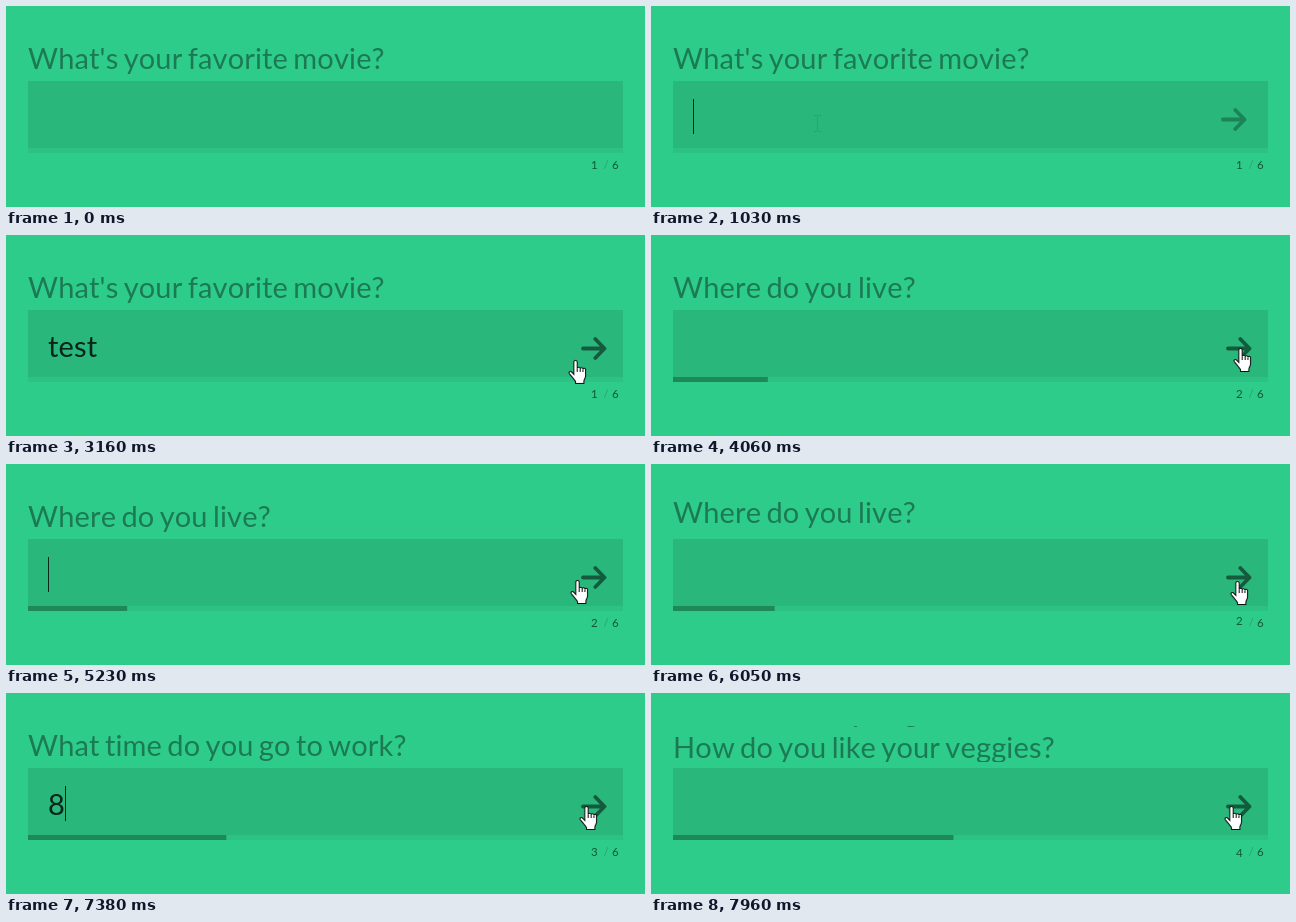
Animation, 639 px wide and 201 px high, one loop 8 s. Source, as an HTML page:

```html
<!DOCTYPE html>
<html lang="en">
<head>
<meta charset="utf-8">
<title>Minimal form</title>
<style>
html, body { margin: 0; width: 100%; height: 100%; overflow: hidden; background: #2ecc8a; }
body { position: relative; font: 29px Lato, sans-serif; font-kerning: none; }
svg { position: absolute; left: 0; top: 0; }

.rows, .bar, .next, .typed, .words, .mouse, .mouse > g { animation: 8s linear infinite; }

.questions { letter-spacing: .15px; word-spacing: -2.3px; fill: rgba(0, 0, 0, .4); }
.count { font-size: 11.5px; fill: rgba(0, 0, 0, .58); }
.slash { fill: rgba(0, 0, 0, .2); }

/* one row per step, shared by questions and counter */
.rows { animation-name: rows; animation-timing-function: ease; }
.questions .rows { --row: -36px; }
.count .rows { --row: -18px; }
@keyframes rows {
  0%, 46.5% { transform: translateY(0); }
  51.5%, 75.075% { transform: translateY(var(--row)); }
  /* the last slide is cut short by the loop */
  80.075%, 95.95% {
    transform: translateY(calc(var(--row) * 2));
    animation-timing-function: cubic-bezier(.28, .093, .306, .859);
  }
  100% { transform: translateY(calc(var(--row) * 2.978)); }
}

.bar { fill: rgba(0, 0, 0, .3); transform-origin: 22px 0; animation-name: bar; animation-timing-function: ease-in-out; }
@keyframes bar {
  0%, 46.5% { transform: scaleX(0); }
  51.5%, 75.075% { transform: scaleX(.16667); }
  80.075%, 95.95% {
    transform: scaleX(.33333);
    animation-timing-function: cubic-bezier(.4325, 0, .6416, .7508);
  }
  100% { transform: scaleX(.48775); }
}

.next {
  fill: none; stroke: #000; stroke-opacity: .5; stroke-width: 3.8; stroke-linecap: round; stroke-linejoin: round;
  animation-name: next; animation-timing-function: ease;
}
@keyframes next {
  0%, 11.625% { opacity: 0; transform: translateX(-12px); }
  15.375%, 100% { opacity: 1; transform: translateX(0); }
}

/* the right border is the caret */
.typed {
  position: absolute; left: 42px; top: 93px; height: 35px; box-sizing: border-box;
  overflow: hidden; white-space: nowrap; line-height: 35px; letter-spacing: .15px;
  color: rgba(0, 0, 0, .8); border-right: 1px solid transparent;
  animation-name: type; animation-timing-function: step-end;
}
@keyframes type {
  0% { width: 1px; border-color: transparent; }
  11.75% { width: 1px; border-color: #08251a; }
  17.875% { width: 1px; border-color: transparent; }
  21.375% { width: 12px; border-color: #08251a; }
  25.25% { width: 27px; border-color: #08251a; }
  28.25% { width: 40px; border-color: #08251a; }
  32.875% { width: 51px; border-color: #08251a; }
  39.125% { width: 51px; border-color: transparent; }
  46.5% { width: 1px; border-color: transparent; }
  52% { width: 1px; border-color: #08251a; }
  58.375% { width: 1px; border-color: transparent; }
  65.375% { width: 1px; border-color: #08251a; }
  68.5% { width: 16px; border-color: #08251a; }
  74.125% { width: 16px; border-color: transparent; }
  75.075% { width: 1px; border-color: transparent; }
  80% { width: 1px; border-color: #08251a; }
  86.25% { width: 1px; border-color: transparent; }
  87.75% { width: 18px; border-color: #08251a; }
  94% { width: 18px; border-color: transparent; }
  95.95%, 100% { width: 1px; border-color: transparent; }
}
.words { animation-name: words; animation-timing-function: step-end; }
@keyframes words {
  0% { transform: translateY(0); }
  46.5% { transform: translateY(-35px); }
  75.075%, 100% { transform: translateY(-70px); }
}

.mouse { animation-name: move; }
@keyframes move {
  0%, 5.75% { transform: translate(189px, 190px); }
  9.5%, 33.25% { transform: translate(166px, 117px); }
  35% { transform: translate(240px, 165px); }
  36.875% { transform: translate(400px, 184px); }
  38.5% { transform: translate(520px, 160px); }
  39.5% { transform: translate(570px, 125px); }
  41.625%, 43.25% { transform: translate(580px, 113px); }
  44%, 53.5% { transform: translate(590px, 113px); }
  54.875%, 68.25% { transform: translate(572px, 116px); }
  69.25%, 71.5% { transform: translate(588px, 123px); }
  72.25%, 84.75% { transform: translate(587px, 117px); }
  87%, 91.75% { transform: translate(575px, 114px); }
  92.25%, 100% { transform: translate(581px, 113px); }
}
.mouse > g { fill: #fff; stroke: #111; animation-timing-function: step-end; }
.mouse > .ibeam { fill: none; stroke: #d64783; animation-name: ibeam; }
.mouse > .arrow { animation-name: arrow; }
.mouse > .hand { animation-name: hand; }
@keyframes ibeam { 0% { opacity: 0; } 8% { opacity: 1; } 34.375%, 100% { opacity: 0; } }
@keyframes arrow { 0% { opacity: 0; } 5.75% { opacity: 1; } 8% { opacity: 0; } 34.375% { opacity: 1; } 38.875%, 100% { opacity: 0; } }
@keyframes hand { 0% { opacity: 0; } 38.875%, 100% { opacity: 1; } }
</style>
</head>
<body>
<svg width="639" height="201" viewBox="0 0 639 201">
  <clipPath id="line"><rect x="0" y="33" width="639" height="36"/></clipPath>
  <clipPath id="digit"><rect x="580" y="148" width="16" height="18"/></clipPath>

  <g class="questions" clip-path="url(#line)">
    <g class="rows">
      <text x="22" y="63">What's your favorite movie?</text>
      <text x="22" y="99">Where do you live?</text>
      <text x="22" y="135">What time do you go to work?</text>
      <text x="22" y="171">How do you like your veggies?</text>
    </g>
  </g>

  <rect x="22" y="75" width="595" height="67" fill-opacity=".1"/>
  <rect class="bar" x="22" y="142" width="595" height="5"/>
  <rect x="22" y="142" width="595" height="5" fill-opacity=".05"/>

  <g class="count">
    <g clip-path="url(#digit)">
      <g class="rows">
        <text x="585" y="163">1</text>
        <text x="585" y="181">2</text>
        <text x="585" y="199">3</text>
        <text x="585" y="217">4</text>
      </g>
    </g>
    <text class="slash" x="597.5" y="163">/</text>
    <text x="606" y="163">6</text>
  </g>

  <path class="next" d="M577 113.5H598M589.3 104L598.5 113.5L589.3 123"/>
</svg>

<div class="typed"><div class="words">test<br>a<br>8</div></div>

<svg width="639" height="201" viewBox="0 0 639 201">
  <g class="mouse">
    <g class="ibeam"><path d="M-3 -7.5H0M1 -7.5H4M.5 -7V8M-3 8.5H0M1 8.5H4"/></g>
    <g class="arrow"><path d="M.5 .5V16.5L4.2 13L6.7 18.5L9 17.5L6.6 12.2H11.5Z"/></g>
    <g class="hand"><g transform="translate(-8 0) scale(1.06 1)">
      <path d="M5.4 14.5V2a1.6 1.6 0 0 1 3.2 0V8.5a1.4 1.4 0 0 1 2.8 .3a1.3 1.3 0 0 1 2.6 .4a1.2 1.2 0 0 1 2.5 1V16c0 2-1.3 3-1.6 5v2.5H7V21.5C5.5 19 3 16 1 13.5C.3 12 2.2 10.8 3.6 12.4z"/>
      <path fill="none" d="M8.6 8.5v3.5M11.4 9v3M14 9.5v2.5"/>
    </g></g>
  </g>
</svg>
</body>
</html>
```
